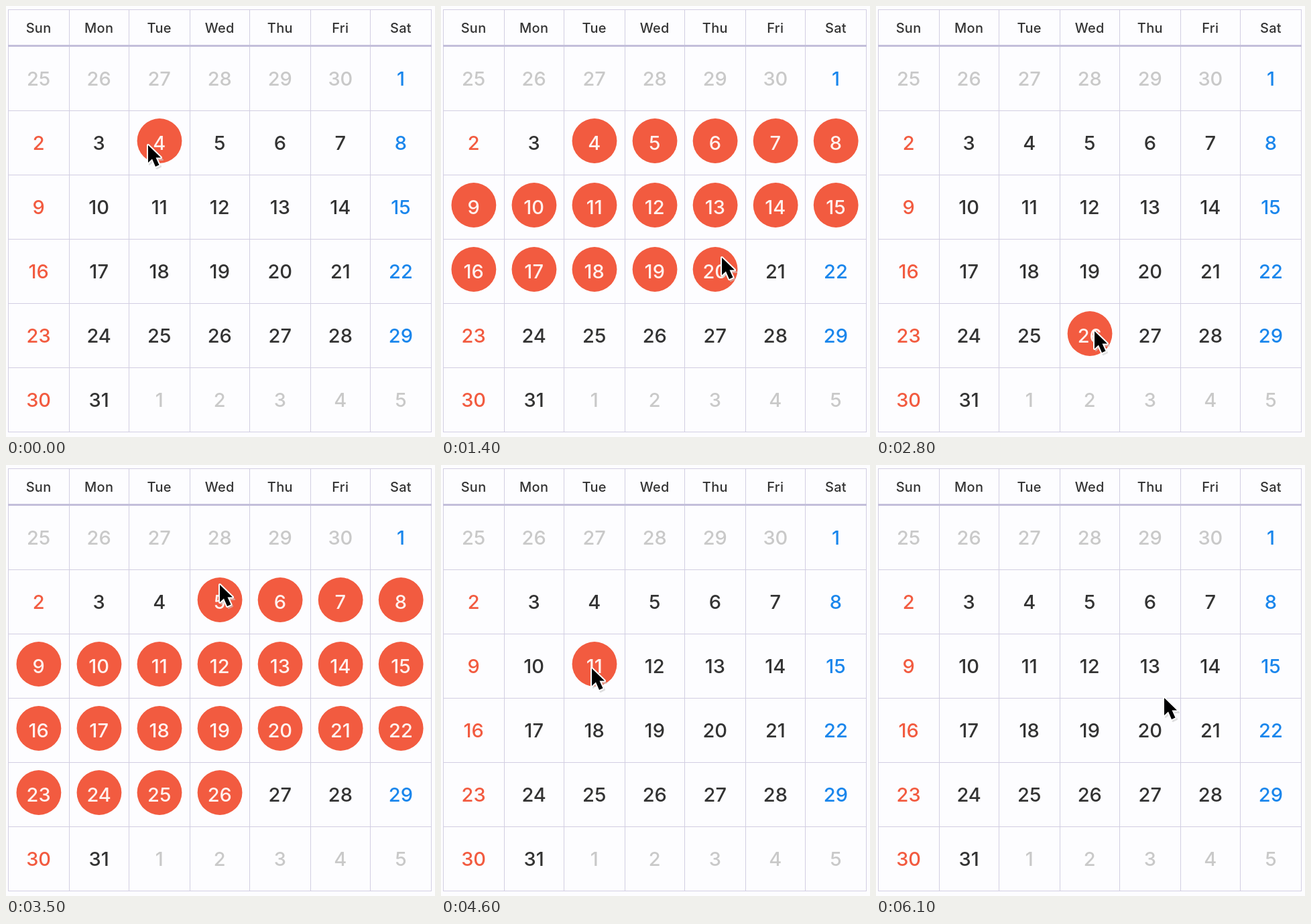
Write an HTML page that moves like this. It is 640 px wide and 644 px high and loops after 6.2 s.

```html
<!DOCTYPE html>
<html lang="en">
<head>
<meta charset="utf-8">
<title>Date range picker</title>
<style>
  html, body { margin: 0; width: 100%; height: 100%; overflow: hidden; background: #fdfdff; }
  svg { display: block; }
  text { font: 500 29px Inter, sans-serif; text-anchor: middle; fill: #333; }
  .head { font-size: 20px; letter-spacing: .3px; }
  .sun { fill: #f25b40; }
  .sat { fill: #1a86ec; }
  .out { fill: #c9c9c9; }
  .on text { fill: #fff1ee; }
  circle { fill: #f25b40; visibility: hidden; }
  .on circle { visibility: visible; }
  .grid { stroke: #d2cee2; }
  .rule { stroke: #c3bfda; stroke-width: 3; }
</style>
</head>
<body>
<svg width="640" height="644" viewBox="0 0 640 644">
  <g id="calendar"></g>
  <g id="cursor" stroke-linejoin="round">
    <path d="M3 5V31L9 26L14 37L20 34L15 24H23Z" fill="#ccc" stroke="#ccc" stroke-width="2" opacity=".6"/>
    <path d="M1 2V28L7 22.5L12 34L17.5 31.5L12.5 20.5H20Z" stroke="#fff" stroke-width="4" paint-order="stroke"/>
  </g>
</svg>
<script>
const LOOP = 6200, STEP = 100, DWELL = 200;
const LEFT = 3.5, TOP = 60.5, COL = 90, ROW = 96;
const calendar = document.getElementById('calendar');
const cursor = document.getElementById('cursor');

function add(parent, tag, attrs, text = '') {
  const el = document.createElementNS('http://www.w3.org/2000/svg', tag);
  for (const key in attrs) el.setAttribute(key, attrs[key]);
  el.textContent = text;
  return parent.appendChild(el);
}

const line = (x1, y1, x2, y2, cls = 'grid') =>
  add(calendar, 'line', { x1, y1, x2, y2, class: cls });

const centre = col => 48.6 + col * 90.05;

for (let col = 0; col <= 7; col++) {
  const x = LEFT + col * COL + col % 2;
  line(x, 5, x, 636);
}
line(3, 5.5, 635, 5.5);
for (let row = 1; row <= 6; row++) line(3, TOP + row * ROW, 635, TOP + row * ROW);
line(3, 59.5, 635, 59.5, 'rule');

'Sun Mon Tue Wed Thu Fri Sat'.split(' ').forEach((name, col) =>
  add(calendar, 'text', { x: centre(col), y: 39.7, class: 'head' }, name));

// Day 1 is the last cell of the first week.
const cells = Array.from({ length: 42 }, (_, i) => {
  const day = i - 5, col = i % 7, row = Math.floor(i / 7);
  const kind = day < 1 || day > 31 ? 'out' : col === 0 ? 'sun' : col === 6 ? 'sat' : '';
  const label = day < 1 ? day + 30 : day > 31 ? day - 31 : day;
  const group = add(calendar, 'g', {});
  add(group, 'circle', { cx: centre(col) + .3, cy: TOP + 45 + row * ROW, r: 33.4 });
  add(group, 'text', { x: centre(col), y: TOP + 58.8 + row * ROW, class: kind }, label);
  return { day, group };
});

// The pointer arrives at each stop, may click, and rests briefly.
const stops = [
  { at: 0, x: 211, y: 206, click: true },
  { at: 1200, x: 418, y: 374, click: true },
  { at: 2000, x: 391, y: 486 },
  { at: 2700, x: 325, y: 484, click: true },
  { at: 3400, x: 318, y: 177, click: true },
  { at: 4000, x: 464, y: 362 },
  { at: 4500, x: 224, y: 302, click: true },
  { at: 5100, x: 224, y: 302, click: true },
  { at: 6000, x: 429, y: 346 }
];

const dayAt = ({ x, y }) =>
  Math.floor((y - TOP) / ROW) * 7 + Math.floor((x - LEFT) / COL) - 5;

// First click picks a day, a second one closes the range or clears the same day.
function choose(range, day) {
  if (range.length !== 1) return [day];
  return range[0] === day ? [] : [range[0], day].sort((a, b) => a - b);
}

function pointerAt(t) {
  const i = stops.findLastIndex(s => s.at <= t);
  const from = stops[i], to = stops[i + 1] || from;
  const leave = from.at + DWELL;
  const u = t <= leave ? 0 : Math.min(1, (t - leave) / (to.at - leave));
  const e = u * u * (3 - 2 * u);
  return [from.x + (to.x - from.x) * e, from.y + (to.y - from.y) * e];
}

function draw(now) {
  const t = Math.floor(now % LOOP / STEP) * STEP;
  const range = stops.filter(s => s.click && s.at <= t).map(dayAt).reduce(choose, []);
  for (const { day, group } of cells)
    group.classList.toggle('on', day >= range[0] && day <= range.at(-1));
  cursor.setAttribute('transform', `translate(${pointerAt(t)})`);
}

const start = performance.now();
function tick() {
  draw(performance.now() - start);
  requestAnimationFrame(tick);
}
tick();
</script>
</body>
</html>
```
